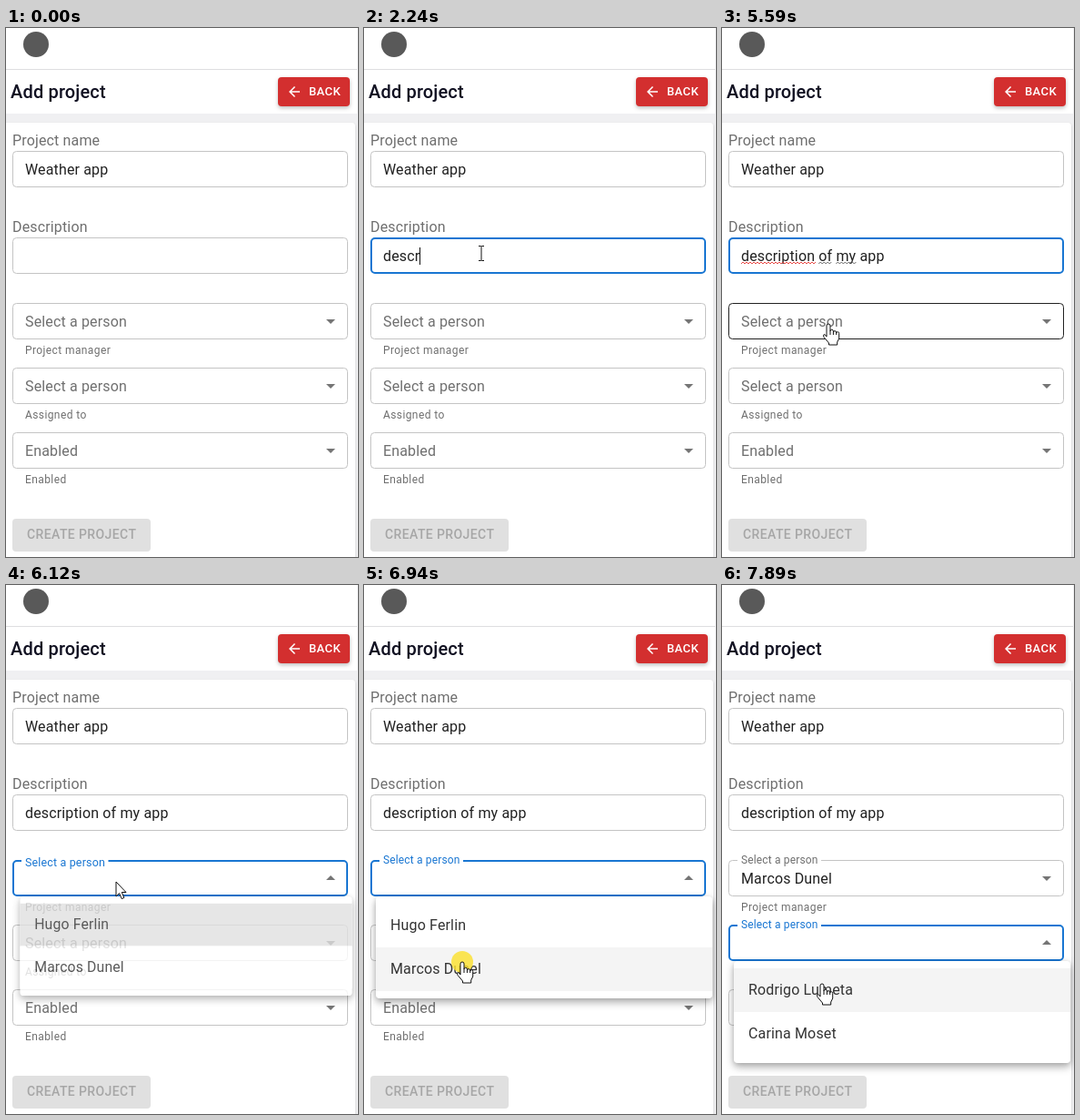
An HTML page for the animation above (8 s loop, 387 px wide and 581 px high).

```html
<!DOCTYPE html>
<html lang="en">
<head>
<meta charset="utf-8">
<title>Add project</title>
<style>
html, body { margin: 0; width: 387px; height: 581px; overflow: hidden; background: #f0f0f2; }
svg { display: block; }
text { font-family: Roboto, sans-serif; letter-spacing: .15px; }
.small { letter-spacing: .4px; }
.button { font-weight: 500; letter-spacing: .4px; }
.title { font-weight: 500; }
.paper { filter: drop-shadow(0 4px 5px rgba(0,0,0,.3)) drop-shadow(0 1px 2px rgba(0,0,0,.12)); }
.lift { filter: drop-shadow(0 2px 2px rgba(0,0,0,.25)); }
.card { filter: drop-shadow(0 1px 1px rgba(0,0,0,.18)); }
</style>
</head>
<body>
<svg id="stage" width="387" height="581"></svg>
<script>
const LOOP = 8000, TICK = 68;
const BLUE = '#1976d2', INK = '#212121', SOFT = '#6f6f6f', LINE = '#c4c4c4';
const PROMPT = 'Select a person', MESSAGE = 'description of my app';
const MANAGERS = ['Hugo Ferlin', 'Marcos Dunel'];
const WORKERS = ['Rodrigo Lumeta', 'Carina Moset'];

// Moments when one more character appears ("io" arrives as a pair)
const KEYS = [1520, 1720, 1780, 1980, 2240, 2440, 2510, 2650, 2710, 2710, 2980, 3180,
  3650, 3720, 3850, 3990, 4050, 4190, 4320, 4460, 4530];
const SPELLING = [[3180, 0, 11, '#e53935'], [3850, 12, 14, '#555'], [4250, 15, 17, '#555']];

// Pointer: time, x, y, shape; held until GLIDE, interpolated afterwards
const GLIDE = 5984;
const POINTER = [
  [70, 130, 320, 'hand'], [130, 130, 250, 'beam'], [200, 130, 171, 'beam'],
  [860, 130, 198, 'arrow'], [930, 129, 247, 'beam'],
  [5460, 125, 290, 'arrow'], [5530, 117, 325, 'hand'], [5650, 114, 342, 'hand'],
  [5790, 118, 332, 'hand'], [5850, 121, 326, 'hand'],
  [6052, 121, 326, 'arrow'], [6256, 121, 326, 'arrow'], [6380, 118, 354, 'hand'],
  [6732, 108, 414, 'hand'], [7140, 108, 414, 'hand'], [7344, 118, 392, 'hand'],
  [7580, 118, 392, 'arrow'], [7670, 117, 400, 'arrow'], [7684, 116, 424, 'hand'],
  [7888, 110, 438, 'hand']];
const PRESSES = [[930, 990], [5984, 6052], [6868, 7004], [7480, 7548]];

const SHAPES = {
  beam: '<path d="M-3-7.500h2.500l.5.5.5-.5H3M0-7V8M-3 8.500h2.500l.5-.5.5.5H3" fill="none" stroke="#111"/>',
  arrow: '<path d="M0 0V16l3.600-3.400 2.600 6 2.700-1.100-2.600-6H11z" fill="#fff" stroke="#111"/>',
  hand: '<path d="M-2 14V2a2 2 0 0 1 4 0V8a1.700 1.700 0 0 1 3.400 0v1a1.700 1.700 0 0 1 3.300 0v1' +
    'a1.500 1.500 0 0 1 3 .5V16l-2 4v3H.5v-2L-5 14.500q-1.500-3 1-3zM2 8v4M5.400 9v3M8.700 10v2" ' +
    'fill="#fff" stroke="#111"/>'
};

const ruler = document.createElement('canvas').getContext('2d');
const textWidth = s => {
  ruler.font = '16px Roboto, sans-serif';
  return ruler.measureText(s).width + .15 * s.length;
};
const clamp = x => Math.max(0, Math.min(1, x));
const mix = (a, b, p) => a + (b - a) * p;
const easeOut = x => 1 - (1 - clamp(x)) ** 3;
const within = (t, a, b) => t >= a && t < b;

const text = (s, x, y, size = 16, fill = SOFT, cls = '') =>
  `<text x="${x}" y="${y}" font-size="${size}" fill="${fill}" class="${cls}">${s}</text>`;
const rect = (x, y, w, h, fill, rest = '') =>
  `<rect x="${x}" y="${y}" width="${w}" height="${h}" fill="${fill}" ${rest}/>`;

function outline(y, focus, hover) {
  const w = focus ? 2 : 1;
  const color = focus ? BLUE : hover ? INK : LINE;
  return rect(7 + w / 2, y + w / 2, 369 - w, 40 - w, '#fff', `rx="4" stroke="${color}" stroke-width="${w}"`);
}

function select(y, label, helper, { shrink = 0, focus, hover, open, value = '' } = {}) {
  const size = mix(16, 12, shrink);
  const notch = shrink ? rect(17, y - 1, textWidth(label) * size / 16 + 8, 4, '#fff') : '';
  return outline(y, focus, hover) + notch +
    text(label, 21, y + mix(26, 4, shrink), size, focus ? BLUE : SOFT) +
    text(value, 21, y + 26, 16, INK) +
    `<path d="M7 10l5 5 5-5z" fill="#757575" transform="translate(345 ${y + 8})${open ? ' rotate(180 12 12)' : ''}"/>` +
    text(helper, 21, y + 56, 12, SOFT, 'small');
}

function menu(top, items, t, opens, closes, pointer, keyFocus) {
  if (t < opens || t > closes + 200) return '';
  const out = clamp((t - closes) / 200);
  const scale = mix(.75, 1, easeOut((t - opens) / 160)) - .25 * out * out;
  const opacity = easeOut((t - opens) / 240) * (1 - out);
  const over = Math.floor((pointer.y - top - 8) / 48);
  const rows = items.map((name, i) => {
    const y = top + 8 + 48 * i;
    const shade = keyFocus && !i ? '#e0e0e0' : i === over ? '#f4f4f4' : '#fff';
    return rect(13, y, 370, 48, shade) + text(name, 29, y + 29, 16, '#333');
  });
  return `<g opacity="${opacity}" transform="translate(198 ${top}) scale(${scale} ${scale * scale}) translate(-198 ${-top})">` +
    rect(13, top, 370, 112, '#fff', 'rx="4" class="paper"') + rows.join('') + '</g>';
}

function wave(from, to, color) {
  let d = `M${from} 259`;
  for (let x = from, up = true; x < to - 1; x += 2, up = !up) d += `l2 ${up ? -2 : 2}`;
  return `<path d="${d}" fill="none" stroke="${color}" stroke-width=".9"/>`;
}

function description(t) {
  const focus = within(t, 990, GLIDE);
  const typed = MESSAGE.slice(0, KEYS.filter(k => k <= t).length);
  let s = outline(230, focus, within(t, 130, 200) || within(t, 930, 990));
  s += text(typed, 21, 256, 16, INK);
  if (focus) {
    for (const [at, a, b, color] of SPELLING)
      if (t >= at) s += wave(21 + textWidth(MESSAGE.slice(0, a)), 21 + textWidth(MESSAGE.slice(0, b)), color);
    if (t < 5130) s += rect(Math.floor(21 + textWidth(typed)), 241, 1, 19, '#111');
  }
  return s;
}

function pointerAt(t) {
  const i = POINTER.findLastIndex(k => k[0] <= t);
  if (i < 0) return { x: -99, y: -99, shape: 'beam' };
  const [at, x, y, shape] = POINTER[i], next = POINTER[i + 1];
  if (t < GLIDE || !next) return { x, y, shape };
  const p = (t - at) / (next[0] - at);
  return { x: mix(x, next[1], p), y: mix(y, next[2], p), shape };
}

const page =
  rect(0, 0, 386, 94, '#fff') + rect(0, 45, 386, 1, '#dedee0') +
  '<circle cx="33" cy="18" r="14" fill="#595959"/>' +
  text('Add project', 5, 77, 20, '#111122', 'title') +
  rect(299, 54, 79, 32, '#d32f2f', 'rx="4" class="lift"') +
  '<path d="M20 11H7.830l5.590-5.590L12 4l-8 8 8 8 1.410-1.410L7.830 13H20z" fill="#fff" transform="translate(308 61) scale(.75)"/>' +
  text('BACK', 333, 74, 13, '#fff', 'button') +
  rect(-6, 104, 390, 490, '#fff', 'rx="4" class="card"') +
  text('Project name', 7, 129) + outline(135) + text('Weather app', 21, 161, 16, INK) +
  text('Description', 7, 224) +
  rect(7, 539, 152, 36, '#e0e0e0', 'rx="4"') +
  text('CREATE PROJECT', 23, 561, 14, '#a6a6a6', 'button');

function scene(time) {
  const t = time < GLIDE ? time : GLIDE + TICK * Math.floor((time - GLIDE) / TICK);
  const pointer = pointerAt(t);
  const first = {
    shrink: easeOut((t - 6020) / 200),
    focus: within(t, GLIDE, 7548),
    hover: within(t, 70, 130) || within(t, 5530, GLIDE),
    open: within(t, 6020, 7000),
    value: t >= 7000 ? MANAGERS[1] : ''
  };
  const second = {
    shrink: easeOut((t - 7560) / 200),
    focus: t >= 7548,
    hover: within(t, 7270, 7548),
    open: t >= 7580
  };
  const press = PRESSES.some(([a, b]) => within(t, a, b));
  return page + description(t) +
    select(302, PROMPT, 'Project manager', first) +
    select(373, PROMPT, 'Assigned to', second) +
    select(444, 'Enabled', 'Enabled') +
    menu(342, MANAGERS, t, 6020, 7000, pointer, t < 6868) +
    menu(413, WORKERS, t, 7580, LOOP, pointer, false) +
    (press ? `<circle cx="${pointer.x}" cy="${pointer.y}" r="12" fill="#fbe02a" opacity=".8"/>` : '') +
    `<g transform="translate(${Math.round(pointer.x)} ${Math.round(pointer.y)})">${SHAPES[pointer.shape]}</g>`;
}

const stage = document.getElementById('stage');
const start = performance.now();
let shown = '';
function draw() {
  const next = scene((performance.now() - start) % LOOP);
  if (next !== shown) stage.innerHTML = shown = next;
  requestAnimationFrame(draw);
}
draw();
</script>
</body>
</html>
```
